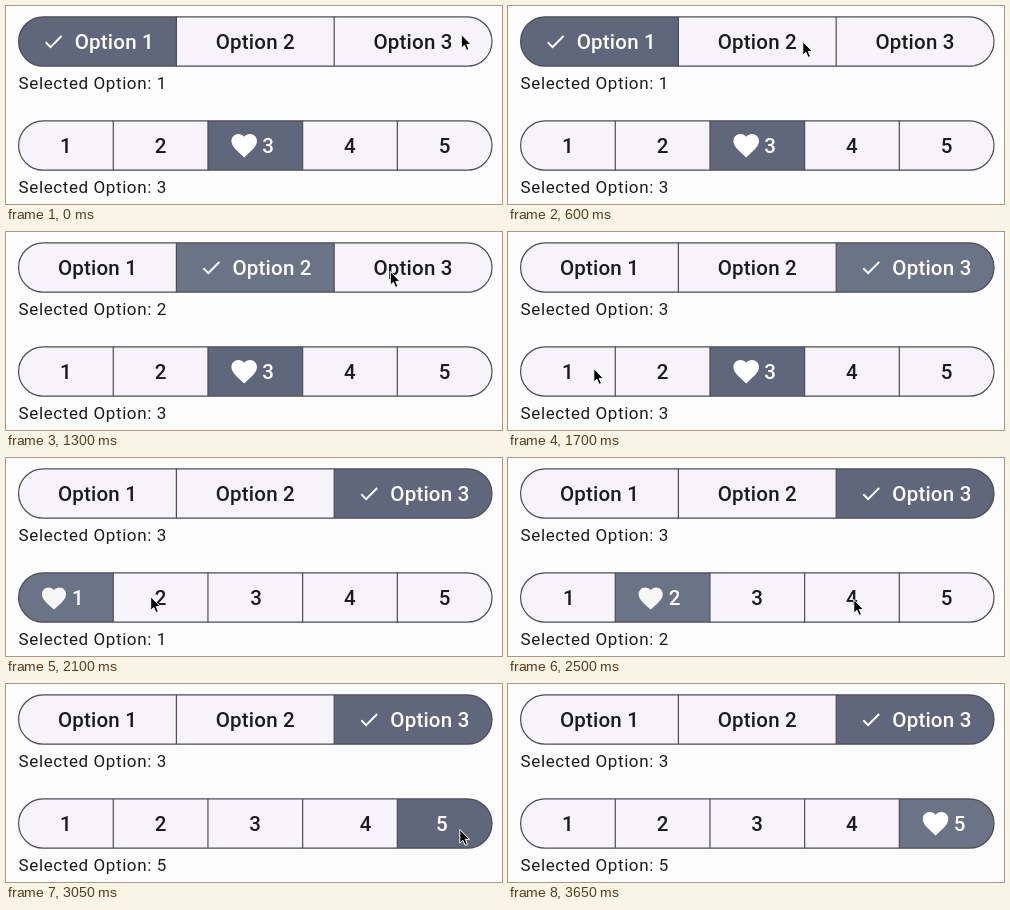
Animation of 496x198 px, one loop 3950 ms. Source, as an HTML page:

```html
<!DOCTYPE html>
<html lang="en">
<head>
<meta charset="utf-8">
<title>Segmented buttons</title>
<style>
  html, body { margin: 0; width: 100%; height: 100%; overflow: hidden; background: #fdfcfd; }
  svg { display: block; width: 496px; height: 198px; }
  text { font-family: Roboto, sans-serif; }
  .label { font-size: 20.5px; font-weight: 500; letter-spacing: .2px; text-anchor: middle; }
  .status { font-size: 17px; letter-spacing: .6px; fill: #1b1b1f; }
  .line { fill: none; stroke: #4d4c55; stroke-width: 1.2; }
</style>
</head>
<body>
<svg id="stage" viewBox="0 0 496 198"></svg>
<script>
const LOOP = 3950, STEP = 50, MORPH = 350;
const LEFT = 12.6, WIDTH = 473.4, HEIGHT = 49.4;
const PALE = [247, 243, 251], DARK = [96, 102, 124], FOCUS = [107, 115, 134];
const TEXT_SHIFT = 16.8;

const CHECK = 'M9 16.17L4.83 12l-1.42 1.41L9 19 21 7l-1.41-1.41z';
const HEART = 'M12 21.35l-1.45-1.32C5.4 15.36 2 12.28 2 8.5 2 5.42 4.42 3 7.5 3c1.74 0 3.41.81 4.5 2.09' +
  'C13.09 3.81 14.76 3 16.5 3 19.58 3 22 5.42 22 8.5c0 3.78-3.4 6.86-8.55 11.54z';

// iconX is measured from the cell centre; nudge is the label shift while an icon takes up room
const rows = [
  { y: 10.8, labels: ['Option 1', 'Option 2', 'Option 3'], start: 0,
    icon: CHECK, size: 23.5, iconX: -55.8, iconY: 23.8, nudge: 0 },
  { y: 114.8, labels: ['1', '2', '3', '4', '5'], start: 2,
    icon: HEART, size: 30.6, iconX: -26.4, iconY: 124.2, nudge: -3.8 }
];

const clicks = [
  { t: 900, row: 0, cell: 1 },
  { t: 1350, row: 0, cell: 2 },
  { t: 1850, row: 1, cell: 0 },
  { t: 2250, row: 1, cell: 1 },
  { t: 2600, row: 1, cell: 3 },
  { t: 3000, row: 1, cell: 4 }
];

// time, x, y of the pointer tip
const pointerPath = [
  [0, 455, 28], [450, 293, 36], [550, 293, 36], [600, 294.5, 35], [750, 313, 38],
  [950, 313, 38], [1300, 384, 39], [1350, 384, 39], [1700, 85.5, 136], [1900, 85.5, 136],
  [2200, 165, 139], [2250, 165, 139], [2500, 345.5, 141], [2650, 345.5, 141],
  [2950, 453.5, 145], [3450, 453.5, 145]
];
const POINTER_HIDE = 3450;

const stage = document.getElementById('stage');

function add(parent, tag, attrs, text) {
  const el = document.createElementNS('http://www.w3.org/2000/svg', tag);
  for (const key in attrs) el.setAttribute(key, attrs[key]);
  if (text) el.textContent = text;
  parent.appendChild(el);
  return el;
}

const clamp = v => Math.min(1, Math.max(0, v));
const mix = (a, b, k) => a + (b - a) * k;
const blend = (a, b, k) => `rgb(${a.map((v, i) => Math.round(mix(v, b[i], k)))})`;
const smooth = k => k * k * (3 - 2 * k);

// cubic-bezier(.4, 0, .2, 1)
function ease(x) {
  if (x <= 0) return 0;
  if (x >= 1) return 1;
  let lo = 0, hi = 1;
  for (let i = 0; i < 24; i++) {
    const s = (lo + hi) / 2, r = 1 - s;
    if (3 * r * r * s * .4 + 3 * r * s * s * .2 + s ** 3 < x) lo = s; else hi = s;
  }
  return 3 * (1 - lo) * lo * lo + lo ** 3;
}

function buildRow(row, r) {
  const n = row.labels.length, w = WIDTH / n;
  const pill = { x: LEFT, y: row.y, width: WIDTH, height: HEIGHT, rx: HEIGHT / 2 };
  add(add(stage, 'clipPath', { id: 'pill' + r }), 'rect', pill);
  const fills = add(stage, 'g', { 'clip-path': `url(#pill${r})` });
  row.cells = row.labels.map((label, i) => {
    const x = LEFT + i * w;
    return {
      mid: x + w / 2,
      fill: add(fills, 'rect', { x, y: row.y, width: w, height: HEIGHT }),
      icon: add(stage, 'path', { d: row.icon, fill: '#fff' }),
      text: add(stage, 'text', { class: 'label', y: row.y + 31.9 }, label)
    };
  });
  add(stage, 'rect', { class: 'line', ...pill });
  for (let i = 1; i < n; i++) {
    const x = LEFT + i * w;
    add(stage, 'path', { class: 'line', d: `M${x} ${row.y}v${HEIGHT}` });
  }
  row.status = add(stage, 'text', { class: 'status', x: 12.6, y: row.y + 72.5 });
}

// how strongly the most recently clicked cell is highlighted
function focusAt(t, r, i) {
  const k = clicks.findIndex(c => c.row === r && c.cell === i);
  if (k < 0) return 0;
  const next = clicks[k + 1];
  return clamp((t - clicks[k].t - 50) / 100) * (next ? 1 - clamp((t - next.t) / 100) : 1);
}

function drawRow(row, r, t) {
  let chosen = row.start, before = -1, since = -Infinity;
  for (const c of clicks) {
    if (c.row === r && c.t <= t) {
      before = chosen;
      chosen = c.cell;
      since = c.t;
    }
  }
  const p = ease((t - since) / MORPH);
  row.cells.forEach((cell, i) => {
    const on = i === chosen;
    const shown = on ? p : i === before ? 1 - p : 0;
    cell.fill.setAttribute('fill', on ? blend(DARK, FOCUS, focusAt(t, r, i)) : blend(PALE, PALE, 0));
    cell.text.setAttribute('fill', on ? '#fff' : '#1b1b1f');
    cell.text.setAttribute('x', cell.mid + TEXT_SHIFT * shown + (on ? row.nudge : 0));
    // the icon grows from its lower left corner
    cell.icon.setAttribute('opacity', on ? p : 0);
    cell.icon.setAttribute('transform',
      `translate(${cell.mid + row.iconX} ${row.iconY + row.size * (1 - p)}) scale(${row.size / 24 * p})`);
  });
  row.status.textContent = 'Selected Option: ' + (chosen + 1);
}

function drawPointer(t) {
  const shown = t < POINTER_HIDE;
  pointer.setAttribute('visibility', shown ? 'visible' : 'hidden');
  if (!shown) return;
  const i = pointerPath.findIndex(p => p[0] > t);
  const a = pointerPath[i - 1], b = pointerPath[i];
  const k = smooth((t - a[0]) / (b[0] - a[0]));
  pointer.setAttribute('transform', `translate(${mix(a[1], b[1], k)} ${mix(a[2], b[2], k)})`);
}

rows.forEach(buildRow);
const pointer = add(stage, 'path', {
  d: 'M.3 .5V14.2L3.4 11.3L5.6 16.4L8 15.4L5.8 10.4H10z',
  fill: '#000', stroke: '#fff', 'stroke-width': 1, 'stroke-linejoin': 'round'
});

function draw(now) {
  const t = Math.floor(now % LOOP / STEP) * STEP;
  rows.forEach((row, r) => drawRow(row, r, t));
  drawPointer(t);
}

let origin;
function tick(now) {
  origin ??= now;
  draw(now - origin);
  requestAnimationFrame(tick);
}
draw(0);
requestAnimationFrame(tick);
</script>
</body>
</html>
```
